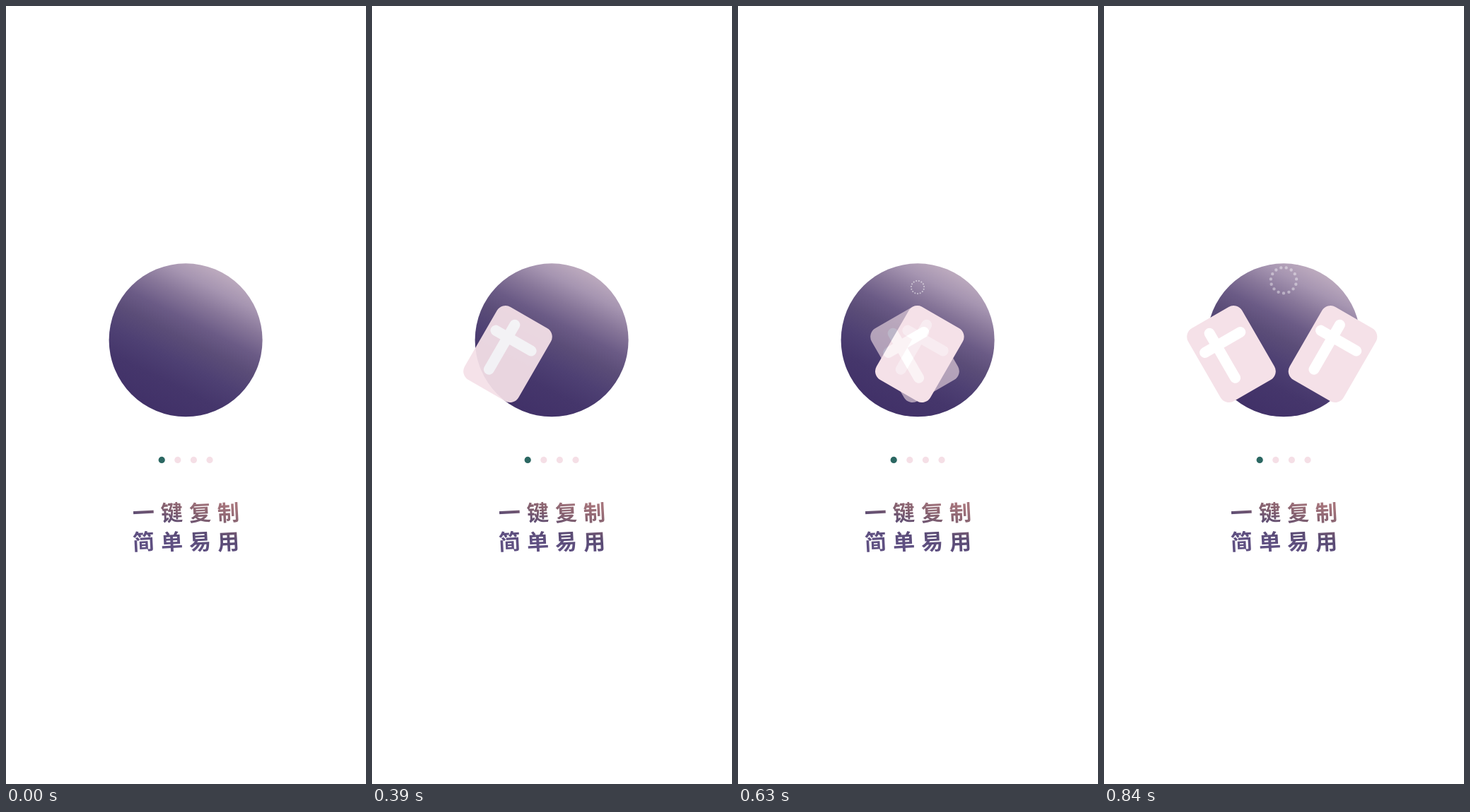
Recreate the animation shown at these times as an HTML page. Size 509 px wide and 1101 px high, loop 0.87 s.

```html
<!DOCTYPE html>
<html lang="zh-CN">
<head>
<meta charset="utf-8">
<style>
  html, body { margin: 0; width: 100%; height: 100%; overflow: hidden; background: #fff; }
  svg { display: block; width: 100%; height: 100%; }
  text { font: 700 31px "Noto Sans CJK SC", "Noto Sans CJK", sans-serif; }
</style>
</head>
<body>
<svg viewBox="0 0 509 1101">
  <defs>
    <linearGradient id="ball" gradientUnits="userSpaceOnUse" x1="303" y1="376" x2="205" y2="569">
      <stop offset="0" stop-color="#bcaabe"/>
      <stop offset=".12" stop-color="#a695b1"/>
      <stop offset=".25" stop-color="#877699"/>
      <stop offset=".38" stop-color="#6b5b86"/>
      <stop offset=".5" stop-color="#5b4d78"/>
      <stop offset=".65" stop-color="#4e4073"/>
      <stop offset=".8" stop-color="#45366b"/>
      <stop offset="1" stop-color="#413168"/>
    </linearGradient>
    <linearGradient id="ink" gradientUnits="userSpaceOnUse" x1="288" y1="700" x2="270" y2="770">
      <stop offset="0" stop-color="#a6757c"/>
      <stop offset=".35" stop-color="#83606f"/>
      <stop offset=".65" stop-color="#5a4b74"/>
      <stop offset="1" stop-color="#5f5082"/>
    </linearGradient>
    <g id="card">
      <rect x="-44" y="-59.6" width="88" height="119.2" rx="14" fill="#f5e1e8"/>
      <path d="M-12.1-40.7V32.1M-31.4-20.4H26.5" stroke="#fff" stroke-width="15" stroke-linecap="round"/>
    </g>
  </defs>

  <circle cx="254.1" cy="472.8" r="108.5" fill="url(#ball)"/>
  <circle id="ring" r="18.2" fill="none" stroke="#fff" stroke-width="4.4"
          stroke-linecap="round" pathLength="15" stroke-dasharray="0 1"/>
  <use id="first" href="#card"/>
  <use id="second" href="#card"/>

  <g fill="#f5dfe6">
    <circle cx="220.2" cy="642.4" r="4.6" fill="#2b6762"/>
    <circle cx="242.8" cy="642.4" r="4.6"/>
    <circle cx="265.4" cy="642.4" r="4.6"/>
    <circle cx="288" cy="642.4" r="4.6"/>
  </g>

  <g fill="url(#ink)">
    <text x="179.5 219.5 259.5 299.5" y="729.3" rotate="-3">一键复制</text>
    <text x="179.5 219.5 259.5 299.5" y="770.3" rotate="-3">简单易用</text>
  </g>
</svg>
<script>
  const LOOP = 870, STEP = 30;
  const [ring, first, second] = ['ring', 'first', 'second'].map(id => document.getElementById(id));

  // Linear interpolation through [time, value] points, clamped at both ends.
  function track(t, ...points) {
    let [t0, v0] = points[0];
    if (t <= t0) return v0;
    for (const [t1, v1] of points) {
      if (t < t1) return v0 + (v1 - v0) * (t - t0) / (t1 - t0);
      [t0, v0] = [t1, v1];
    }
    return v0;
  }

  function place(el, x, y, turn, scale, alpha) {
    el.setAttribute('transform', `translate(${x} ${y}) rotate(${turn}) scale(${scale})`);
    el.setAttribute('opacity', alpha);
  }

  function draw(now) {
    const t = Math.floor(now % LOOP / STEP) * STEP;
    place(first, track(t, [30, 105], [540, 228.2], [840, 323.5]), 492.5, 30, 1,
          track(t, [30, 0], [415, 1]));
    place(second, track(t, [540, 280], [840, 180]), 492.5, -30, 1,
          track(t, [540, 0], [690, 1]));
    place(ring, 254, track(t, [570, 400.5], [630, 398], [750, 393], [840, 388.2]), 90,
          track(t, [570, 0], [690, 1]),
          track(t, [570, 0], [690, 1], [750, 1], [840, .4]));
    requestAnimationFrame(draw);
  }
  draw(0);
</script>
</body>
</html>
```
